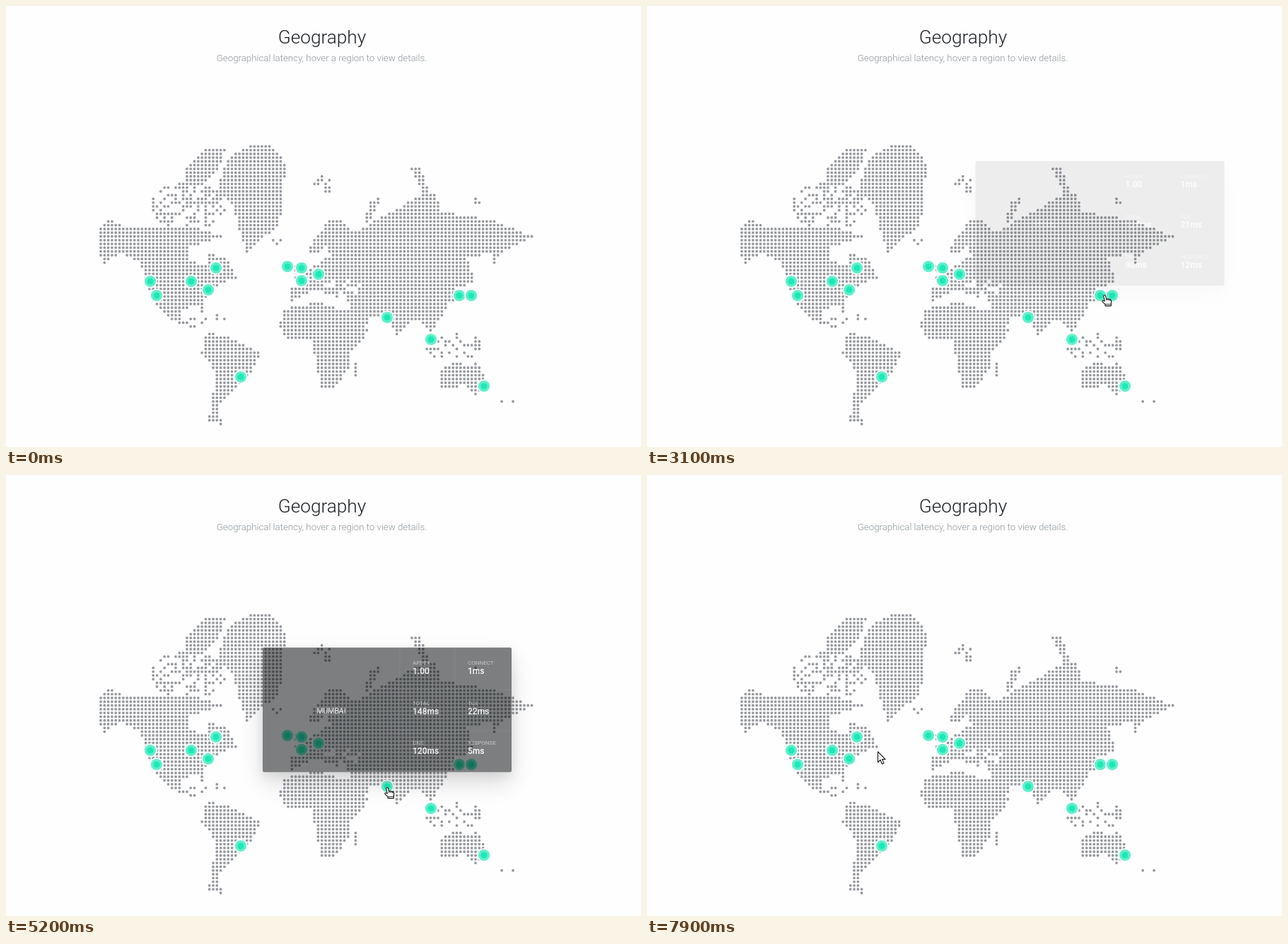
An HTML page that plays this animation: 898x623 px, repeating every 8 s.

```html
<!DOCTYPE html>
<html lang="en">
<head>
<meta charset="utf-8">
<title>Geography</title>
<style>
html, body { margin: 0; width: 100%; height: 100%; overflow: hidden; background: #fefefe; }
svg { position: absolute; left: 0; top: 0; overflow: visible; font-family: Roboto, sans-serif; }
#card {
  position: absolute; left: 0; top: 0; width: 352px; height: 176px; border-radius: 2px;
  background: rgba(4, 8, 9, .7);
  box-shadow: 0 15px 35px rgba(0, 0, 0, .2), 0 5px 15px rgba(0, 0, 0, .1);
}
.label { font-size: 8px; fill: #fff; fill-opacity: .58; }
.value { font-size: 12px; font-weight: 500; fill: #fff; }
#city { font-size: 10.4px; fill: #fff; text-anchor: middle; }
.head { font-weight: 300; text-anchor: middle; }
</style>
</head>
<body>
<svg width="898" height="623" viewBox="0 0 898 623">
  <text class="head" x="447" y="53" font-size="26.2" fill="#1b2126">Geography</text>
  <text class="head" x="446.6" y="78" font-size="13.27" fill="#8d959b">Geographical latency, hover a region to view details.</text>
  <path id="dots" fill="none" stroke="#95989d" stroke-width="3.8" stroke-linecap="round"/>
  <g id="markers"></g>
</svg>
<div id="card">
  <svg width="352" height="176">
    <path d="M194 0V176M272 0V176M194 59.5H352M194 117.5H352" stroke="#fff" stroke-opacity=".07" fill="none"/>
    <text id="city" x="97" y="93"></text>
    <g id="stats"></g>
  </svg>
</div>
<svg width="898" height="623" viewBox="0 0 898 623">
  <g id="cursor" fill="#fff" stroke="#111" stroke-width="1.1" stroke-linejoin="round">
    <path id="arrow" d="M.5 .8V15.8L4 12.5L6.5 18.2L9 17.1L6.6 11.6H11Z"/>
    <g id="hand" transform="translate(-4 0)">
      <path d="M2.7 2A1.4 1.4 0 0 1 5.4 1.4L6.6 5.6L11.6 6.4Q13.6 6.8 13.7 9L13.3 12.4V15.6H5V13.4L1 9.8Q.4 8.2 2 8L4.3 9Z"/>
      <path d="M6.6 5.6V8M9 6V8.2M11.4 6.4V8.6M5 13.3H13.3" fill="none" stroke-width=".9"/>
    </g>
  </g>
</svg>
<script>
const $ = id => document.getElementById(id);
const points = s => s.split(' ').map(p => p.split(',').map(Number));
const LOOP = 8000, STEP = 100, FADE = 600;

// Key points of each coast; a grid of dots fills the shapes.
const coasts = {
  northAmerica: '132,311 148,302 170,312 268,313 308,325 256,342 256,358 281,366 288,350 314,358 327,384 304,392 281,414 279,434 271,424 248,428 250,442 275,458 240,447 208,418 190,362 160,349 140,365 132,350',
  southAmerica: '284,459 326,472 360,490 346,517 300,566 306,592 286,588 297,517 276,490',
  greenland: '345,196 376,196 396,224 387,307 340,350 318,275 297,266 312,217',
  ellesmere: '283,201 310,202 298,235 275,254 253,252 256,228',
  africa: '404,424 440,419 486,431 500,456 516,456 488,490 487,508 464,540 446,540 432,471 396,470 387,455 390,432',
  eurasia: '425,345 456,303 476,303 490,321 590,266 608,265 616,290 690,303 746,326 698,350 690,369 688,350 652,354 664,392 632,398 643,420 630,416 600,462 582,440 552,466 544,446 518,438 502,458 486,432 488,418 432,403 402,418 402,398 416,398 410,384 460,352 452,338 442,350',
  novayaZemlya: '507,306 512,280 534,266 516,304',
  severnayaZemlya: '572,229 587,229 598,264 590,266',
  australia: '612,514 640,502 656,510 664,502 682,531 664,551 650,537 612,539'
};

// Islands and inland seas as speckled ellipses: centre, radii, share of dots
const islands = [
  [258, 282, 52, 34, .58], [450, 250, 14, 16, .5], [386, 332, 11, 5, .6], [416, 374, 10, 18, .6],
  [285, 443, 25, 8, .4], [495, 513, 4, 10, .8], [632, 480, 48, 20, .36], [710, 560, 9, 12, .35], [661, 276, 10, 4, .7]
];
const seas = [[476, 401, 30, 15, .45], [446, 412, 14, 9, .4]];

function inside(poly, x, y) {
  let hit = false;
  poly.forEach(([ax, ay], i) => {
    const [bx, by] = poly[(i || poly.length) - 1];
    if ((ay > y) !== (by > y) && x < ax + (y - ay) * (bx - ax) / (by - ay)) hit = !hit;
  });
  return hit;
}

function noise(c, r) {
  const n = Math.sin(c * 12.99 + r * 78.23) * 43758.5;
  return n - Math.floor(n);
}

function drawMap() {
  const pitch = 5.3, left = 134, top = 198.3, cols = 116, rows = 75;
  const land = Object.values(coasts).map(points);
  let d = '';
  for (let r = 0; r < rows; r++) for (let c = 0; c < cols; c++) {
    const x = left + c * pitch, y = top + r * pitch, n = noise(c, r);
    const speckled = ([cx, cy, rx, ry, share]) => n < share && Math.hypot((x - cx) / rx, (y - cy) / ry) < 1;
    const solid = land.some(p => inside(p, x, y)) && !seas.some(speckled);
    if (solid || islands.some(speckled)) d += `M${x.toFixed(1)} ${y.toFixed(1)}h0`;
  }
  $('dots').setAttribute('d', d);
}

const sites = '204,389 213,409 262,389 286,401 297,370 332,524 398,368 418,370 418,388 442,379 539,440 601,471 641,409 658,409 676,537';
$('markers').innerHTML = points(sites).map(([x, y]) =>
  `<g transform="translate(${x} ${y})"><circle r="9.8" fill="#fefefe"/><circle r="8.1" fill="#62efcb"/><circle r="4.6" fill="#1de9b6"/></g>`).join('');

const labels = ['APDEX', 'CONNECT', 'TOTAL', 'TLS', 'DNS', 'RESPONSE'];
$('stats').innerHTML = labels.map((name, i) => {
  const x = 212 + i % 2 * 78, y = 24.3 + (i >> 1) * 56.6;
  return `<text class="label" x="${x}" y="${y}">${name}</text><text class="value" x="${x}" y="${y + 13}"></text>`;
}).join('');
const values = document.querySelectorAll('.value');

// lead: how far the fade has run when the card first shows
const cards = [
  { city: 'TOKYO', x: 658, y: 409, on: 1700, off: 2700, lead: 27, stats: '0.99 25ms 106ms 24ms 37ms 21ms' },
  { city: 'SEOUL', x: 640.5, y: 409, on: 3100, off: 4000, lead: 60, stats: '1.00 1ms 124ms 21ms 90ms 12ms' },
  { city: 'MUMBAI', x: 539, y: 440, on: 5000, off: 6100, lead: 64, stats: '1.00 1ms 148ms 22ms 120ms 5ms' },
  { city: 'FRANKFURT', x: 442, y: 378, on: 7000, off: 7600, lead: 147, stats: '0.99 9ms 124ms 40ms 58ms 16ms' }
];

// Pointer: where it enters, then each move as start, end, x, y
const entry = { time: 500, x: 369, y: 260 };
const moves = [
  [500, 700, 528, 240], [1000, 1400, 669, 407], [1600, 1700, 661, 408], [2600, 3100, 647, 408],
  [3900, 4100, 601, 438], [4100, 4300, 575, 451], [4300, 4900, 539, 441],
  [6000, 7000, 443, 383], [7500, 7800, 348, 386], [7800, 7900, 326, 390]
];

// CSS "ease" curve
function ease(t) {
  if (t >= 1) return 1;
  let lo = 0, hi = 1;
  const bez = (s, a, b) => 3 * s * (1 - s) * (1 - s) * a + 3 * s * s * (1 - s) * b + s ** 3;
  for (let i = 0; i < 24; i++) {
    const mid = (lo + hi) / 2;
    if (bez(mid, .25, .25) < t) lo = mid; else hi = mid;
  }
  return bez(lo, .1, 1);
}

function pointer(t) {
  let { x, y } = entry;
  for (const [start, end, toX, toY] of moves) {
    const f = Math.min(1, Math.max(0, (t - start) / (end - start)));
    x += (toX - x) * f;
    y += (toY - y) * f;
  }
  return [x, y];
}

const show = (id, on) => { $(id).style.display = on ? '' : 'none'; };

function render(t) {
  const card = cards.find(c => t >= c.on && t < c.off);
  show('card', card);
  if (card) {
    const p = ease((t - card.on + card.lead) / FADE);
    $('card').style.opacity = p;
    $('card').style.transform = `translate(${card.x - 176}px, ${card.y - 189 - 10 * p}px)`;
    $('city').textContent = card.city;
    card.stats.split(' ').forEach((v, i) => { values[i].textContent = v; });
  }
  show('cursor', t >= entry.time);
  show('hand', card);
  show('arrow', !card);
  $('cursor').setAttribute('transform', `translate(${pointer(t)})`);
}

function tick() {
  render(Math.floor(performance.now() % LOOP / STEP) * STEP);
  requestAnimationFrame(tick);
}

drawMap();
tick();
</script>
</body>
</html>
```
